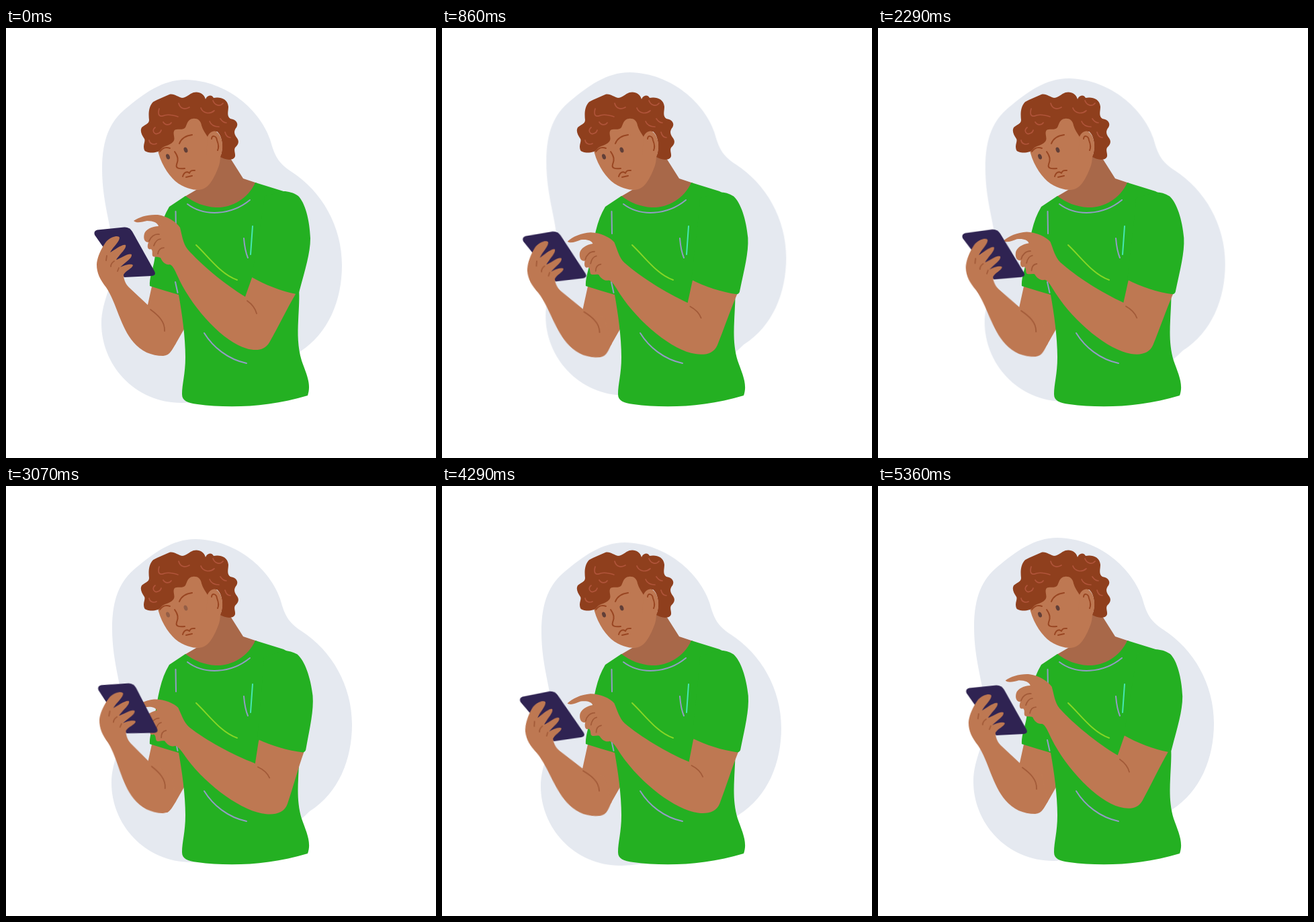
Recreate the animation shown at these times as an HTML page. Size 640 by 640 pixels, loop 5.43 s.

```html
<!DOCTYPE html>
<html lang="en">
<head>
<meta charset="utf-8">
<title>Man tapping on a phone</title>
<style>
  @property --arm { syntax: "<angle>"; inherits: true; initial-value: 0deg; }

  html, body { margin: 0; width: 100%; height: 100%; overflow: hidden; background: #fff; }
  svg {
    display: block; width: 100%; height: 100%;
    --skin: #be7852; --green: #24b022; --lilac: #939cc5; --crease: #a25a38;
    animation: tap 5430ms linear infinite;
  }

  .blob { fill: #e5e9f0; animation: drift 5430ms linear infinite; }
  .skin { fill: var(--skin); }
  .shade { fill: #a86849; }
  .hair { fill: #8f3f1d; }
  .shirt { fill: var(--green); }
  .phone { fill: #2f2352; }
  .eyes { fill: #613f38; animation: blink 5430ms linear infinite; }

  .line { fill: none; stroke-width: 2; stroke-linecap: round; stroke-linejoin: round; }
  .curls { stroke: #b0543a; stroke-width: 1.7; }
  .features { stroke: #994622; }
  .creases { stroke: var(--crease); stroke-width: 1.8; }
  .folds { stroke: var(--lilac); }
  .lime { stroke: #86d626; }
  .mint { stroke: #46e7b4; }

  .tapping { transform-origin: 432px 328px; transform: rotate(var(--arm)); }
  .sleeve { transform-origin: 442px 268px; transform: rotate(calc(var(--arm) * .42)); }
  .holding { transform-origin: 264px 473px; animation: hold 5430ms linear infinite; }

  @keyframes tap {
    0% { --arm: 0deg; }
    15.84% { --arm: -7.2deg; }
    26.34% { --arm: -12.4deg; }
    28.7% { --arm: -12.7deg; }
    31% { --arm: -12.2deg; }
    42.17% { --arm: -7deg; }
    45.5% { --arm: -6.6deg; }
    49% { --arm: -7.5deg; }
    56.54% { --arm: -10.8deg; }
    62% { --arm: -12.3deg; }
    65% { --arm: -12.5deg; }
    69% { --arm: -11.9deg; }
    79% { --arm: -8.6deg; }
    98.71% { --arm: -.6deg; }
    100% { --arm: 0deg; }
  }
  @keyframes hold {
    0% { transform: rotate(0deg); }
    10.5% { transform: rotate(-2.6deg); }
    15.84% { transform: rotate(-3.95deg); }
    21% { transform: rotate(-5.3deg); }
    26.34% { transform: rotate(-6deg); }
    30% { transform: rotate(-6.3deg); }
    33.1% { transform: rotate(-5.9deg); }
    42.17% { transform: rotate(-2.1deg); }
    49.7% { transform: rotate(1.2deg); }
    53.5% { transform: rotate(2.1deg); }
    56.54% { transform: rotate(1.9deg); }
    63.2% { transform: rotate(.4deg); }
    73.7% { transform: rotate(-4.1deg); }
    79% { transform: rotate(-5.5deg); }
    83.8% { transform: rotate(-6.2deg); }
    87.5% { transform: rotate(-5.5deg); }
    94.7% { transform: rotate(-1.6deg); }
    98.71% { transform: rotate(-.1deg); }
    100% { transform: rotate(0deg); }
  }
  @keyframes drift {
    0% { transform: translate(0, 0); }
    10.5% { transform: translate(7.8px, -7px); }
    15.84% { transform: translate(12.3px, -11px); }
    21% { transform: translate(15.2px, -12.2px); }
    26.34% { transform: translate(16.5px, -12px); }
    32% { transform: translate(17px, -9.8px); }
    42.17% { transform: translate(16.7px, -2px); }
    49% { transform: translate(16.3px, .4px); }
    56.54% { transform: translate(15px, 2px); }
    64% { transform: translate(12.6px, 3.9px); }
    73.7% { transform: translate(7.8px, 6.4px); }
    79% { transform: translate(5px, 7.1px); }
    85% { transform: translate(2.2px, 6px); }
    94.7% { transform: translate(.4px, 1.2px); }
    98.71%, 100% { transform: translate(0, 0); }
  }
  @keyframes blink {
    0%, 54.3% { opacity: 1; }
    58.4% { opacity: 0; }
    62.4%, 100% { opacity: 1; }
  }
</style>
</head>
<body>
<svg viewBox="0 0 640 640">
  <path class="blob" d="M267 77C330 78 379 124 393 166C400 190 404 200 425 214C470 243 500 295 500 353C500 405 480 455 437 482C400 520 330 556 262 558C190 558 142 500 142 440C142 405 160 385 160 345C160 300 143 265 143 210C143 165 155 139 178 120C205 98 232 77 267 77Z"/>

  <!-- head -->
  <path class="shade" d="M316 186L334 194L353 224L374 231C360 258 335 270 312 269C295 268 280 262 266 251L283 241C300 240 312 215 316 186Z"/>
  <path class="skin" d="M225 178C229 199 240 217 252 228C264 238 278 241 286 241C300 241 308 227 315 210C318 203 319 197 319 190L316 160L290 130L262 140Z"/>
  <path class="hair" d="M206 182C203 174 208 169 206 165C202 159 199 153 202 148C206 144 213 143 213 137C212 128 212 117 219 110C226 106 236 102 243 99C250 97 256 103 262 104C268 104 273 98 279 96C287 94 295 98 297 106C299 100 306 98 309 104C318 102 330 105 331 117C331 124 328 131 334 135C341 136 347 141 343 148C338 154 340 159 344 164C348 170 345 174 341 178C338 183 344 190 339 194C333 198 325 195 319 192C324 178 322 160 314 154L300 162C297 157 293 152 291 145C290 137 284 134 278 135C271 136 270 141 267 148C263 153 256 149 251 152C247 157 253 164 249 169C243 176 236 174 231 180C227 187 209 187 206 182Z"/>
  <path class="skin" d="M300 162C302 156 309 151 314 155C322 161 325 178 319 192L312 205L298 190Z"/>
  <path class="line curls" d="M228 120C225 130 229 133 236 130C243 128 250 130 256 132M257 112C259 120 266 122 273 118M290 119C293 127 303 129 310 123M308 108C311 116 319 117 323 112M222 148C216 153 221 159 226 157Q230 156 231 152M234 140C237 145 243 145 246 141M213 167C214 173 220 174 224 172M303 139C306 146 312 147 317 147M319 135Q323 141 328 141M326 155Q328 163 334 163"/>
  <path class="line features" d="M229 184C233 178 239 177 244 179M258 172C261 164 269 160 277 159M251 184C256 191 257 196 254 203C252 209 258 210 266 209M263 221C265 214 270 213 273 216C275 211 278 212 281 212M268 222L277 220M306 165C306 159 313 160 314 167C316 172 317 178 315 182"/>
  <g class="eyes">
    <ellipse cx="241" cy="191.500" rx="2.700" ry="4.200" transform="rotate(-20 241 191.500)"/>
    <ellipse cx="267.500" cy="181.500" rx="2.700" ry="4.200" transform="rotate(-20 267.500 181.500)"/>
  </g>

  <!-- body -->
  <path class="skin" d="M218 380L209 421L215 450L228 484L240 486C246 482 248 477 252 471L268 443L260 390Z"/>
  <path class="shirt" d="M267 250L243 266C230 287 226 314 221 345C219 358 213 372 214 384Q236 391 257 397C262 425 267 460 267 490C267 515 262 530 262 545C262 555 270 558 285 560C330 566 390 565 449 547C455 530 447 515 440 495C434 475 434 455 435 435C436 415 437 400 436 390L440 330L430 252L413 243L371 230C360 255 335 268 312 267C295 266 280 260 267 250Z"/>
  <path class="line folds" d="M270 262C295 281 335 279 363 256M252.500 273L253 306M252 378L255.500 394M354 313C355 325 357 335 360 342M295 454C308 475 330 493 358 499"/>
  <path class="line lime" d="M283 323C302 341 320 367 344 375"/>
  <path class="line mint" d="M367 295L364 337"/>

  <!-- tapping arm -->
  <g class="tapping">
    <path class="skin" d="M190 287C198 281 212 277 226 278C240 280 254 289 259 297C262 308 263 320 270 329C290 352 325 381 356 400L367 369L385 335L432 345L431 396C418 418 405 445 392 468C385 480 372 481 358 477C325 468 280 420 258 375C252 362 249 354 244 352C238 353 233 349 230 342C226 340 220 342 218 339C217 335 219 332 216 329C210 331 210 324 212 319C206 319 204 313 206 306C208 300 217 295 227 295C226 290 219 287 210 287C202 289 194 291 190 287Z"/>
    <path class="line creases" d="M213 317C215 311 221 306 228 307M220 324C222 318 226 314 230 314M226 336C227 330 230 327 235 327M359 406C366 411 371 417 373 425"/>
  </g>
  <path class="shirt sleeve" d="M366 371C385 382 410 392 432 396Q436 396 437 390C445 360 453 335 453 313C452 285 445 260 435 250C428 245 420 243 413 243L385 250C380 290 370 340 366 371Z"/>

  <!-- arm with phone -->
  <g class="holding">
    <path class="phone" d="M136 300.500Q130 302 132 308L176 371L217 369Q224 368 221 362L188 303Q184 296 176 296.500Z"/>
    <path class="skin" d="M135 352C136 337 146 322 150 317C157 310 168 308 169 312C169 318 160 325 155 334C161 331 173 321 178 323C180 328 169 337 164 345C170 343 183 334 187 337C188 343 178 348 170 356C176 353 187 350 189 353C188 358 178 361 175 367C175 374 178 381 183 386L214 415L245 430L253 469C247 478 245 487 234 488C216 488 201 481 190 468C170 445 165 410 149 386C140 374 135 365 135 352Z"/>
    <path class="line creases" d="M150 339L149 346M161 347C158 349 156 352 156 355M168 357L166 362M215 419C226 427 237 437 236 451"/>
  </g>
</svg>
</body>
</html>
```
